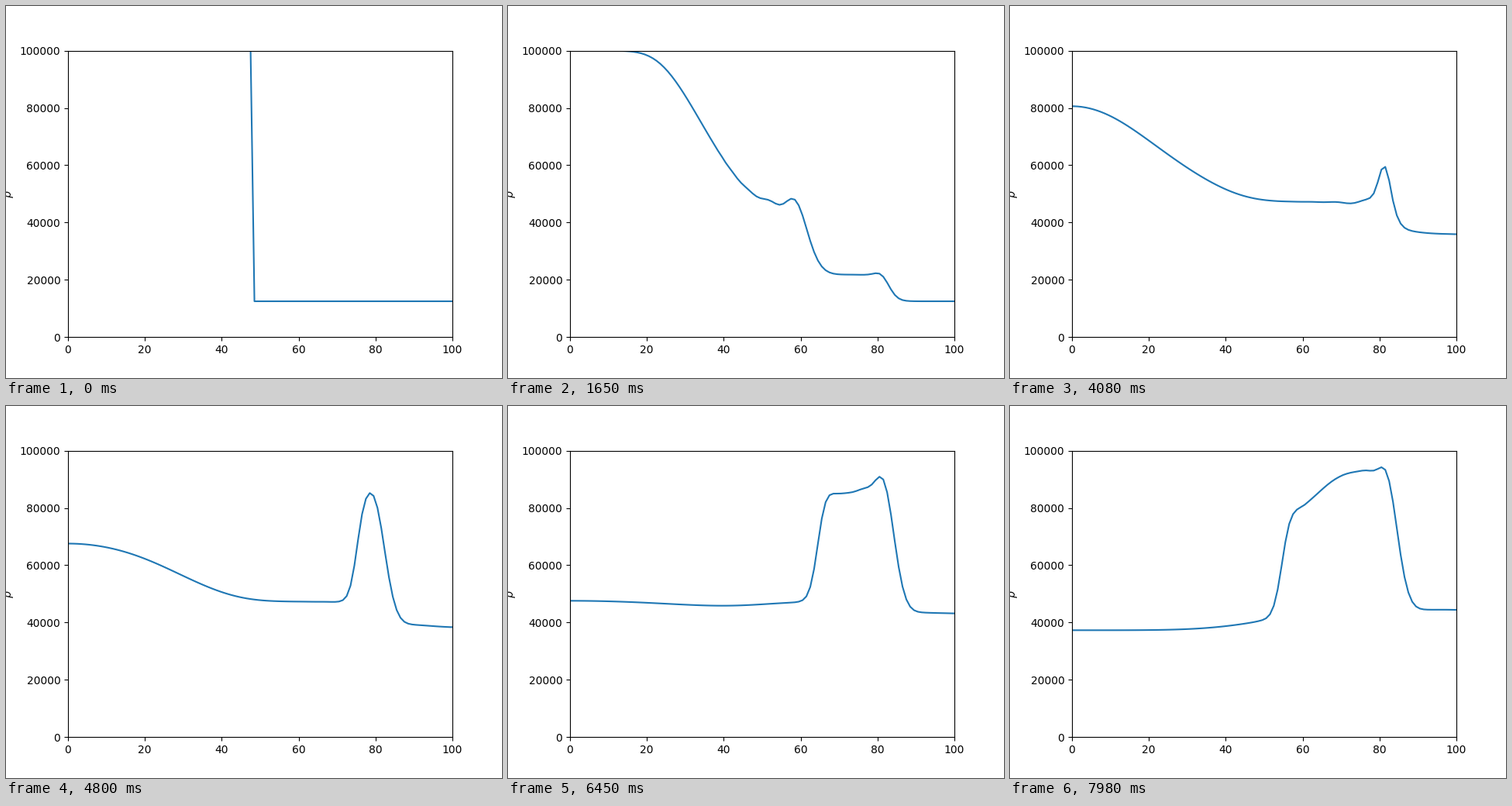
Write a matplotlib script that moves like this. It is 640 by 480 pixels and loops after 8 s.

```python
import numpy as np
import matplotlib.pyplot as plt
from matplotlib.animation import FuncAnimation

# Shock tube with closed ends: one Runge-Kutta step of the Euler equations per frame.
CELLS = 100
SPLIT = 48
GAMMA = 1.4
SCALE = 1e5
FRAMES = 267
LOOP_MS = 8000


def clock(n):
    return 0.346 * n - 0.00016 * n**2


def with_walls(state):
    full = np.pad(state, ((0, 0), (1, 1)), mode="edge")
    full[1, [0, -1]] *= -1
    return full


def rate(state):
    full = with_walls(state)
    rho, mom, energy = full
    u = mom / rho
    p = (GAMMA - 1) * (energy - 0.5 * mom * u)
    flux = np.array([mom, mom * u + p, u * (energy + p)])

    # Sound waves and the contact are damped separately.
    mid_u = 0.5 * (u[1:] + u[:-1])
    c2 = GAMMA * (p[1:] + p[:-1]) / (rho[1:] + rho[:-1])
    contact = (np.diff(rho) - np.diff(p) / c2) * np.array(
        [np.ones_like(mid_u), mid_u, 0.5 * mid_u**2])
    sound = np.diff(full, axis=1) - contact
    damp_sound = np.where(np.diff(u) > 0, 1.05, 0.7)
    damp_contact = 0.02 + 0.23 * np.abs(mid_u)

    face = 0.5 * (flux[:, 1:] + flux[:, :-1]
                  - damp_sound * sound - damp_contact * contact)
    return -np.diff(face, axis=1)


def advance(state, dt):
    a = state + dt * rate(state)
    b = 0.75 * state + 0.25 * (a + dt * rate(a))
    return (state + 2 * (b + dt * rate(b))) / 3


def simulate():
    left = np.arange(CELLS) < SPLIT
    rho = np.where(left, 1.0, 0.125)
    p = np.where(left, 1.0, 0.159)
    state = np.array([rho, np.zeros(CELLS), p / (GAMMA - 1)])
    rows = []
    for n in range(FRAMES):
        rows.append(SCALE * with_walls(state)[0])
        state = advance(state, clock(n + 1) - clock(n))
    return rows


density = simulate()
x = np.arange(-0.5, CELLS + 1)

fig, ax = plt.subplots(figsize=(6.4, 4.8), dpi=100)
ax.set_xlim(0, 100)
ax.set_ylim(0, SCALE)
ax.set_ylabel(r"$\rho$")
line, = ax.plot(x, density[0])


def update(n):
    line.set_ydata(density[n])
    return line,


anim = FuncAnimation(fig, update, frames=FRAMES, interval=LOOP_MS / FRAMES,
                     init_func=lambda: update(0), repeat=True, repeat_delay=0)
plt.show()
```
